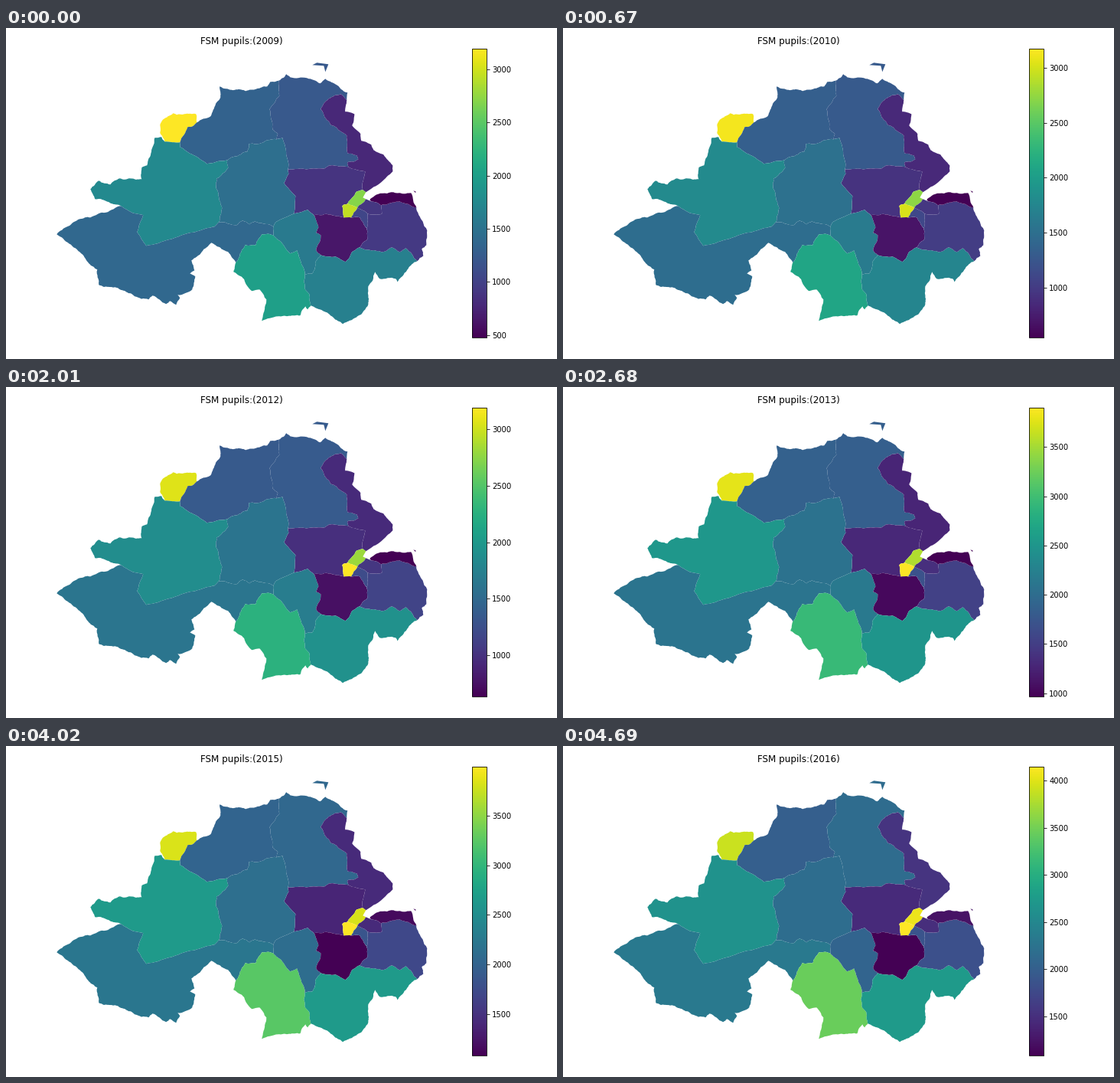
A matplotlib script that plays this animation: 720x432 px, repeating every 7.37 s.

```python
import matplotlib.pyplot as plt
import numpy as np
from matplotlib.animation import FuncAnimation
from matplotlib.cm import ScalarMappable
from matplotlib.colors import Normalize
from matplotlib.patches import PathPatch
from matplotlib.path import Path
from matplotlib.ticker import MultipleLocator

W, H = 720, 432
plt.rcParams["font.family"] = "DejaVu Sans"
rng = np.random.default_rng(7)
arcs = []


def fractal(a, b, rough):
    """Midpoint displacement between two corners; returns points after a."""
    step = b - a
    length = np.hypot(*step)
    if length < 3:
        return [b]
    normal = np.array([-step[1], step[0]]) / length
    shift = rough * min(length, 14) * rng.uniform(-1, 1)
    middle = (a + b) / 2 + normal * shift
    return fractal(a, middle, rough) + fractal(middle, b, rough)


def arc(owners, *coords, rough=0.1):
    """Add a line that bounds one region (coast) or two (shared border)."""
    corners = np.array(coords, float).reshape(-1, 2) + 0.3
    line = [corners[0]]
    for a, b in zip(corners, corners[1:]):
        line += fractal(a, b, rough)
    arcs.append((owners.split(), np.array(line)))


def region_path(name):
    """Join every arc of a region end to end into closed rings."""
    left = [line for owners, line in arcs if name in owners]
    rings = []
    while left:
        ring = left.pop(0)
        while not np.allclose(ring[0], ring[-1]):
            i = next(i for i, line in enumerate(left)
                     if np.allclose(line[0], ring[-1]) or np.allclose(line[-1], ring[-1]))
            line = left.pop(i)
            if np.allclose(line[-1], ring[-1]):
                line = line[::-1]
            ring = np.vstack([ring, line[1:]])
        rings.append(Path(ring, closed=True))
    return Path.make_compound_path(*rings)


# Coasts and outer borders, by their main corners
arc("foyle", 207, 148, 201, 136, 201, 126, 205, 119, 218, 111, 223, 113,
    248, 112, 249, 123)
arc("londonderry", 249, 123, 267, 115, 280, 90, 279, 76, 288, 79, 313, 82,
    341, 76, 345, 70, 357, 68)
arc("n_antrim", 357, 68, 366, 60, 371, 64, 393, 65, 410, 72, 417, 66, 430, 73,
    446, 84, 445, 94)
arc("n_antrim", 400, 48, 406, 45, 421, 47, 417, 57, 415, 49, 400, 48, rough=0)
arc("e_antrim", 445, 94, 443, 109, 455, 112, 452, 127, 463, 138, 464, 147,
    477, 152, 480, 159, 493, 165, 505, 179, 505, 187, 490, 201, 470, 214,
    rough=0.06)
arc("belfast_n", 470, 214, 466, 221, 470, 223, rough=0)
arc("belfast_e", 470, 223, 477, 226, rough=0)
arc("n_down", 477, 226, 475, 224, 481, 219, 503, 214, 529, 215, 536, 234)
arc("n_down", 532, 212, 535, 213, 535, 215, 532, 212, rough=0)
arc("strangford", 536, 234, 546, 258, 550, 264, 549, 283, 543, 288, 545, 297,
    537, 304)
arc("s_down", 537, 304, 530, 308, 511, 331, 509, 327, 488, 327, 482, 318,
    479, 329, 473, 337, 472, 363, 463, 374, 440, 386, 414, 369, 398, 362)
arc("newry", 398, 362, 394, 367, 391, 363, 384, 375, 355, 376, 334, 382,
    340, 354, 331, 341, 321, 343, 307, 324, 297, 318, 300, 306)
arc("fermanagh", 300, 306, 290, 292, 268, 280, 242, 303, 246, 316, 240, 320,
    247, 324, 243, 341, 224, 348, 227, 352, 222, 361, 214, 356, 209, 360,
    191, 349, 186, 354, 168, 350, 146, 339, 121, 335, 119, 315, 108, 307,
    98, 294, 66, 269, 96, 249, 110, 247, 150, 232)
arc("tyrone", 150, 232, 124, 223, 116, 223, 110, 210, 121, 199, 136, 204,
    148, 196, 177, 197, 177, 182, 184, 179, 194, 143, 203, 142, 207, 148)

# Shared borders
arc("foyle tyrone", 207, 148, 227, 149, rough=0.03)
arc("foyle londonderry", 227, 149, 237, 129, 245, 127, 249, 123)
arc("londonderry n_antrim", 357, 68, 357, 88, 344, 106, 348, 132, 355, 138,
    353, 145)
arc("londonderry ulster", 289, 172, 315, 161, 317, 151, 353, 145)
arc("londonderry tyrone", 227, 149, 227, 155, 262, 177, 289, 172, rough=0.05)
arc("n_antrim ulster", 353, 145, 361, 143, 369, 177, 368, 184, rough=0.05)
arc("n_antrim e_antrim", 445, 94, 437, 86, 421, 92, 411, 106, 424, 126,
    445, 140, 446, 163, 458, 166, 460, 171, 446, 175, 447, 181)
arc("n_antrim s_antrim", 368, 184, 416, 183, 422, 179, 447, 181, rough=0.05)
arc("s_antrim e_antrim", 447, 181, 469, 187, 466, 211)
arc("belfast_n e_antrim", 466, 211, 470, 214, rough=0)
arc("s_antrim belfast_n", 466, 211, 458, 213, 446, 229)
arc("s_antrim belfast_w", 446, 229, 439, 232, 441, 247)
arc("s_antrim lagan", 441, 247, 424, 243, 402, 244)
arc("s_antrim bann", 402, 244, 394, 237, 376, 242, rough=0.05)
arc("s_antrim ulster", 368, 184, 369, 190, 363, 202, 378, 219, 376, 242, rough=0.04)
arc("bann ulster", 376, 242, 352, 253, 349, 259, rough=0.03)
arc("ulster fermanagh", 349, 259, 325, 252, 318, 256, 309, 251, 301, 257, 278, 253)
arc("ulster tyrone", 278, 253, 282, 235, 274, 202, 275, 196, 290, 182, 289, 172)
arc("tyrone fermanagh", 278, 253, 272, 259, 227, 271, 183, 284, 171, 266,
    179, 244, 165, 241, 150, 232, rough=0.05)
arc("fermanagh newry", 300, 306, 312, 283, 326, 283, 334, 269, 349, 270)
arc("fermanagh bann", 349, 259, 349, 270)
arc("newry bann", 349, 270, 371, 294, 380, 290, 390, 322)
arc("newry s_down", 390, 322, 390, 339, 396, 347, 398, 362)
arc("bann s_down", 390, 322, 400, 320, 404, 305, 411, 296)
arc("bann lagan", 402, 244, 408, 260, 405, 267, 411, 270, 405, 290, 411, 296)
arc("lagan s_down", 411, 296, 430, 298, 443, 305, 453, 291, 462, 286)
arc("strangford s_down", 462, 286, 490, 292, 504, 286, 514, 292, 522, 287,
    537, 304)
arc("lagan strangford", 462, 286, 472, 275, 471, 261)
arc("lagan belfast_s", 471, 261, 462, 247, 451, 247)
arc("lagan belfast_w", 441, 247, 451, 247)
arc("belfast_w belfast_n", 446, 229, 459, 234)
arc("belfast_w belfast_s", 459, 234, 451, 247)
arc("belfast_n belfast_e", 459, 234, 470, 223)
arc("belfast_s belfast_e", 459, 234, 472, 242)
arc("belfast_s strangford", 471, 261, 472, 242)
arc("belfast_e n_down", 477, 226, 490, 231)
arc("belfast_e strangford", 490, 231, 491, 242, 472, 242)
arc("n_down strangford", 490, 231, 514, 226, 536, 234)

# Colour-scale limits per year, and each region's place on that scale
# in the key years, with straight change between them
YEARS = range(2009, 2017)
LOW = [478, 547, 590, 633, 968, 952, 1083, 1085]
HIGH = [3195, 3174, 3180, 3194, 3900, 3992, 3994, 4150]
KEY_YEARS = (2009, 2012, 2014, 2016)
LEVELS = {
    "foyle": (1, 0.95, 0.97, 0.92),
    "londonderry": (0.31, 0.28, 0.335, 0.30),
    "n_antrim": (0.275, 0.285, 0.315, 0.35),
    "e_antrim": (0.11, 0.12, 0.09, 0.15),
    "s_antrim": (0.15, 0.135, 0.085, 0.12),
    "tyrone": (0.47, 0.485, 0.575, 0.51),
    "ulster": (0.36, 0.385, 0.365, 0.355),
    "fermanagh": (0.335, 0.39, 0.38, 0.405),
    "newry": (0.56, 0.64, 0.71, 0.77),
    "bann": (0.41, 0.42, 0.39, 0.32),
    "lagan": (0.06, 0.04, 0, 0),
    "s_down": (0.43, 0.50, 0.54, 0.54),
    "strangford": (0.165, 0.20, 0.19, 0.245),
    "n_down": (0, 0, 0, 0.05),
    "belfast_n": (0.82, 0.85, 0.91, 0.97),
    "belfast_w": (0.91, 1, 1, 1),
    "belfast_s": (0.21, 0.23, 0.27, 0.26),
    "belfast_e": (0.16, 0.16, 0.11, 0.13),
}

fig = plt.figure(figsize=(W / 72, H / 72), dpi=72, facecolor="white")
ax = fig.add_axes([0, 0, 1, 1])
ax.set(xlim=(0, W), ylim=(H, 0))
ax.axis("off")
title = ax.text(307.5, 21, "", fontsize=12, ha="center", va="baseline")
patches = {name: ax.add_patch(PathPatch(region_path(name), lw=0)) for name in LEVELS}

viridis = plt.get_cmap("viridis")
norm = Normalize(LOW[0], HIGH[0])
cax = fig.add_axes([609.3 / W, 1 - 403.9 / H, 18.85 / W, 377 / H])
fig.colorbar(ScalarMappable(norm, viridis), cax=cax, ticks=MultipleLocator(500))


def draw(frame):
    step = min(frame, len(YEARS) - 1)  # the last year is held
    year = YEARS[step]
    title.set_text(f"FSM pupils:({year})")
    norm.vmin, norm.vmax = LOW[step], HIGH[step]
    for name, patch in patches.items():
        patch.set_facecolor(viridis(float(np.interp(year, KEY_YEARS, LEVELS[name]))))
    return [title, *patches.values()]


anim = FuncAnimation(fig, draw, frames=11, interval=670, repeat=True,
                     repeat_delay=0, blit=False)
plt.show()
```
